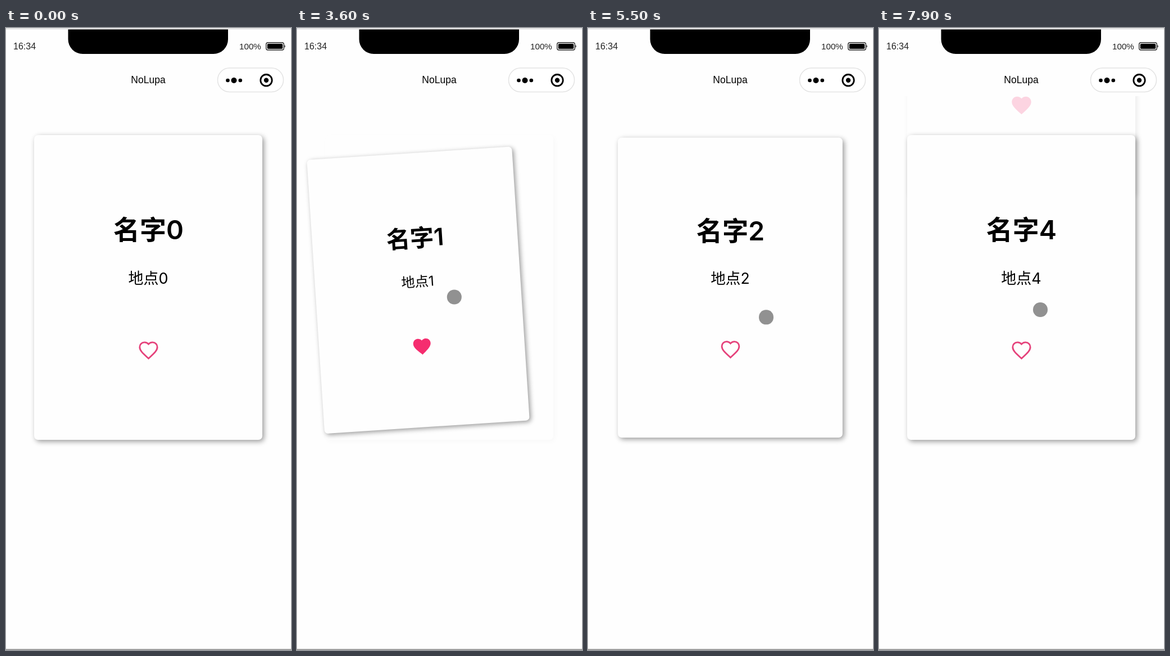
These frames come from a looping animation (507 by 1104 pixels, 8000 ms). An HTML page:

```html
<!DOCTYPE html>
<html lang="zh-CN">
<head>
<meta charset="utf-8">
<title>Card swipe</title>
<style>
html, body { margin: 0; width: 100%; height: 100%; overflow: hidden; background: #fefefe; }
#stage { position: relative; width: 507px; height: 1104px; overflow: hidden; }
.card {
  position: absolute; left: 50px; top: 189.5px; width: 406px; height: 541px;
  border-radius: 7px; background: #fefefe; box-shadow: 3px 3px 10px rgba(0, 0, 0, .4);
}
.card svg { display: block; }
.card text { font-family: Inter, "Noto Sans CJK SC", "Noto Sans CJK", sans-serif; text-anchor: middle; }
.name { font-size: 47px; font-weight: 600; }
.place { font-size: 27px; }
#header { position: absolute; left: 0; top: 0; z-index: 5; }
#header text { font-family: "Liberation Sans", Arial, sans-serif; }
#cursor {
  position: absolute; left: -12.7px; top: -12.7px; width: 25.4px; height: 25.4px;
  border-radius: 50%; background: #919191; z-index: 4;
}
#base { position: absolute; left: 0; right: 0; top: 1102px; height: 2px; background: #a2a2a2; z-index: 5; }
</style>
</head>
<body>
<div id="stage">
  <svg id="header" width="507" height="121">
    <rect width="507" height="121" fill="#fefefe"/>
    <rect width="507" height="2.5" fill="#e4e4e4"/>
    <path d="M110.5 2.5H395V20A26 26 0 0 1 369 46H136.5A26 26 0 0 1 110.5 20Z"/>
    <text x="13" y="38" font-size="16" fill="#222">16:34</text>
    <text x="415" y="38" font-size="15.2" fill="#222">100%</text>
    <rect x="462.7" y="26" width="31.6" height="13" rx="3" fill="none" stroke="#222" stroke-width="1.3"/>
    <rect x="464.8" y="28" width="27.4" height="9" rx="1.5"/>
    <path d="M495.5 30q2.5 2.5 0 5z"/>
    <text x="253" y="97.5" font-size="17.5" text-anchor="middle">NoLupa</text>
    <rect x="376.5" y="71" width="117" height="42.5" rx="21.2" fill="#fff" stroke="#e3e3e3" stroke-width="1.5"/>
    <circle cx="394.5" cy="93" r="3.3"/>
    <circle cx="405.5" cy="93" r="5"/>
    <circle cx="416.8" cy="93" r="3.3"/>
    <circle cx="463" cy="92.7" r="10.2" fill="none" stroke="#000" stroke-width="2.8"/>
    <circle cx="463" cy="92.7" r="4.2"/>
  </svg>
  <div id="cursor"></div>
  <div id="base"></div>
</div>
<script>
const LOOP = 8000, FADE = 500, FLING = 355, GLIDE = 500, ENTER = 100;
const entry = [106, 897];
const heart = 'M12 21.35l-1.45-1.32C5.4 15.36 2 12.28 2 8.5 2 5.42 4.42 3 7.5 3c1.74 0 3.41.81 4.5 2.09' +
  'C13.09 3.81 14.76 3 16.5 3 19.58 3 22 5.42 22 8.5c0 3.78-3.4 6.86-8.55 11.54z';

// The pointer goes from -> to between move and release, pulling the card by drag
const swipes = [
  { press: 900, move: 950, release: 1720, from: [182, 476], to: [336, 496], drag: [154, 20] },
  { press: 2650, move: 3350, release: 4135, from: [338, 465], to: [156, 504], drag: [-117, 15] },
  { press: 5470, move: 5500, release: 6500, from: [317, 513], to: [314, 884], drag: [-19, 245] },
  { press: 7150, move: 7230, release: 7500, from: [290, 650], to: [287, 500], drag: [0, -150] }
];

const clamp = v => Math.min(1, Math.max(0, v));
const smooth = p => p * p * (3 - 2 * p);
const mix = (a, b, p) => a.map((v, i) => v + (b[i] - v) * p);
const pulled = (s, t) => clamp((t - s.move) / (s.release - s.move));

function pointerAt(t) {
  const i = swipes.findLastIndex(s => t >= s.move);
  const now = swipes[i], next = swipes[i + 1];
  if (now && (t < now.release || !next)) return mix(now.from, now.to, pulled(now, t));
  const p = clamp((t - (now ? now.release : ENTER)) / GLIDE);
  return mix(now ? now.to : entry, next.from, smooth(p));
}

function cardPose(s, t) {
  const flown = FLING * clamp((t - s.release) / FADE);
  const reach = pulled(s, t) + flown / Math.hypot(...s.drag);
  const [x, y] = s.drag.map(v => v * reach);
  const scale = t < s.release
    ? 1 - .1 * clamp((t - s.press) / 200)
    : .9 + .1 * clamp((t - s.release) / 300);
  return { x, y, scale };
}

const stage = document.getElementById('stage');
const cursor = document.getElementById('cursor');
const cards = [0, 1, 2, 3, 4].map(i => {
  const el = document.createElement('div');
  const shape = i % 2
    ? `<path d="${heart}" fill="#f52d6f"/>`
    : `<path d="${heart}" transform="translate(12 12.2) scale(.91) translate(-12 -12.2)" fill="none" stroke="#e5427b" stroke-width="1.8"/>`;
  el.className = 'card';
  el.innerHTML = `<svg width="406" height="541" viewBox="50 189.5 406 541">
    <text class="name" x="253.5" y="374.5">名字${i}</text>
    <text class="place" x="253" y="453">地点${i}</text>
    <g transform="translate(253.5 571.7) scale(1.72) translate(-12 -12.17)">${shape}</g></svg>`;
  return stage.appendChild(el);
});

function draw(t) {
  const top = swipes.filter(s => t >= s.release).length;
  let reveal = 0;
  cards.forEach((el, i) => {
    const s = swipes[i];
    const { x, y, scale } = s ? cardPose(s, t) : { x: 0, y: 0, scale: 1 };
    let alpha = 0;
    if (i < top) alpha = 1 - clamp((t - s.release) / FADE);
    if (i === top) {
      alpha = 1;
      reveal = clamp((Math.hypot(x, y) / 240) ** 1.5);
    }
    if (i === top + 1) alpha = reveal;
    el.style.opacity = alpha;
    el.style.zIndex = i === top ? 3 : i < top ? 2 : 1;
    el.style.transform = `translate(${x}px, ${y}px) rotate(${x / 10}deg) scale(${scale})`;
  });
  const [x, y] = pointerAt(t);
  cursor.style.opacity = t < ENTER ? 0 : 1;
  cursor.style.transform = `translate(${x}px, ${y}px)`;
}

const start = performance.now();
function tick() {
  draw((performance.now() - start) % LOOP);
  requestAnimationFrame(tick);
}
tick();
</script>
</body>
</html>
```
